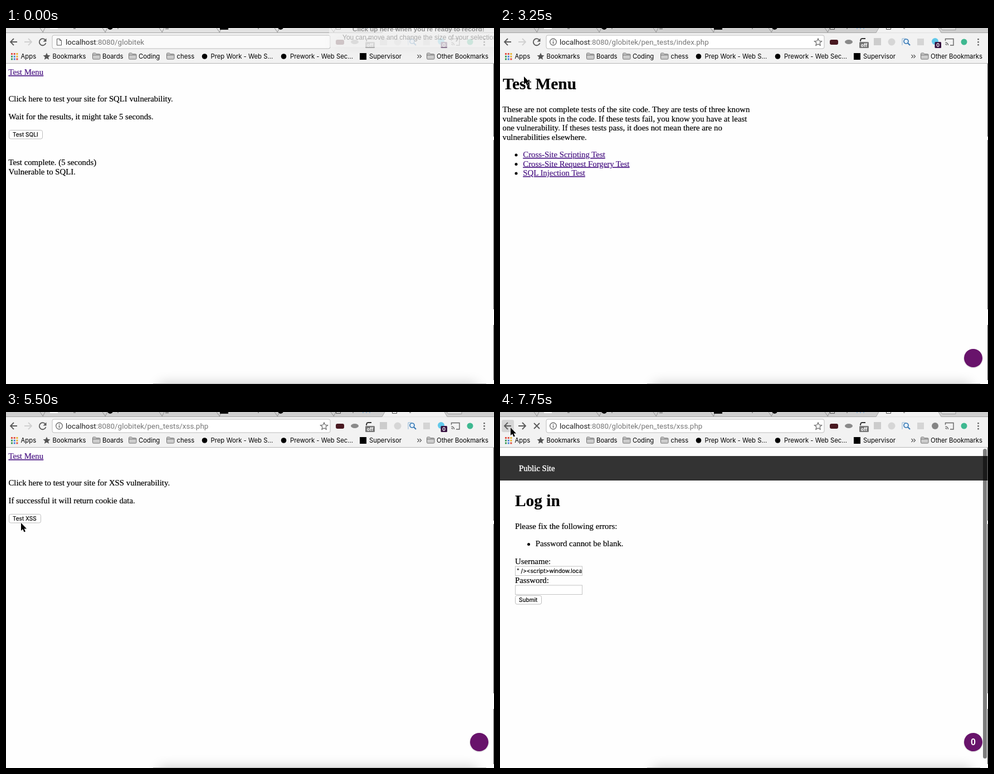
Recreate the animation shown at these times as an HTML page. Size 876 px wide and 639 px high, loop 8 s.

```html
<!DOCTYPE html>
<html lang="en">
<head>
<meta charset="utf-8">
<title>Site vulnerability tests</title>
<style>
  html, body { margin: 0; width: 100%; height: 100%; overflow: hidden; background: #fefefe; }
  svg { display: block; width: 100%; height: 100%; }
  text { white-space: pre; }
  .page { font: 14.8px "Liberation Serif", serif; }
  .page text { stroke: #000; stroke-width: .2; }
  .page .title { font-size: 29.4px; font-weight: bold; }
  .page .link { fill: #4a1684; stroke: #4a1684; text-decoration: underline; }
  .page .ui, .ui { font: 10.1px Inter, sans-serif; }
  .bookmarks { font: 11.3px Inter, sans-serif; }
  .url { font: 13.4px Roboto, sans-serif; }
  .badge { font: bold 8.5px Inter, sans-serif; fill: #fff; text-anchor: middle; }
  .button { fill: #fff; stroke: #bdbdbd; }
  .field { fill: #fff; stroke: #c4c4c4; }
  .line { fill: none; stroke: #5a5a5a; stroke-width: 1.8; }
</style>
</head>
<body>
<svg viewBox="0 0 876 639" preserveAspectRatio="none">
  <defs>
    <filter id="soft" x="-20%" y="-200%" width="140%" height="500%"><feGaussianBlur stdDeviation="11"/></filter>
    <g id="folder"><path d="M.5 2.5q0-1.5 1.5-1.5h3.5l1.5 1.7h5.5q1.5 0 1.5 1.5v6.3q0 1.5-1.5 1.5h-10.5q-1.5 0-1.5-1.5z" fill="#ccc" stroke="#707070"/><path d="M1 4.5h12.5" stroke="#707070"/></g>
    <path id="star" d="M0-6.5 1.9-2.2 6.5-1.8 3 1.3 4.1 5.8 0 3.4-4.1 5.8-3 1.3-6.5-1.8-1.9-2.2Z"/>
  </defs>
  <rect width="876" height="639" fill="#fefefe"/>

  <g class="page" data-show="0 3250">
    <text class="link" x="4.5" y="84">Test Menu</text>
    <text x="4.5" y="132">Click here to test your site for SQLI vulnerability.</text>
    <text x="4.5" y="164">Wait for the results, it might take 5 seconds.</text>
    <rect class="button" x="5.5" y="183.5" width="60" height="15.5" rx="3"/>
    <text class="ui" x="12" y="195">Test SQLI</text>
    <text x="4.5" y="246">Test complete. (5 seconds)</text>
    <text x="4.5" y="262.5">Vulnerable to SQLI.</text>
  </g>

  <g class="page" data-show="3250 4750">
    <text class="title" x="5" y="110">Test Menu</text>
    <text x="4.5" y="151">These are not complete tests of the site code. They are tests of three known</text>
    <text x="4.5" y="167.5">vulnerable spots in the code. If these tests fail, you know you have at least</text>
    <text x="4.5" y="184">one vulnerability. If theses tests pass, it does not mean there are no</text>
    <text x="4.5" y="200.5">vulnerabilities elsewhere.</text>
    <circle cx="29" cy="228" r="2.5"/><circle cx="29" cy="244.5" r="2.5"/><circle cx="29" cy="261" r="2.5"/>
    <text class="link" x="41.3" y="232">Cross-Site Scripting Test</text>
    <text class="link" x="41.3" y="248.5">Cross-Site Request Forgery Test</text>
    <text class="link" x="41.3" y="265">SQL Injection Test</text>
  </g>

  <g class="page" data-show="4750 5750">
    <text class="link" x="4.5" y="84">Test Menu</text>
    <text x="4.5" y="132">Click here to test your site for XSS vulnerability.</text>
    <text x="4.5" y="164">If successful it will return cookie data.</text>
    <rect class="button" x="5.5" y="183.5" width="57" height="15.5" rx="3"/>
    <text class="ui" x="12" y="195">Test XSS</text>
  </g>

  <g class="page" data-show="5750 8000">
    <rect y="79" width="876" height="44" fill="#333"/>
    <text x="34" y="106" style="fill: #fff; stroke: #fff; stroke-width: .4">Public Site</text>
    <text class="title" x="27" y="169">Log in</text>
    <text x="27" y="210">Please fix the following errors:</text>
    <circle cx="51.5" cy="237.5" r="2.5"/>
    <text x="63.7" y="241">Password cannot be blank.</text>
    <text x="27" y="272.5">Username:</text>
    <rect class="field" x="27.5" y="277" width="120" height="16.5"/>
    <svg x="28" y="277" width="118.5" height="17"><text class="ui" x="2" y="12">" /&gt;&lt;script&gt;window.location</text></svg>
    <text x="27" y="306.5">Password:</text>
    <rect class="field" x="27.5" y="311" width="120" height="16.5"/>
    <rect class="button" x="27.5" y="329.5" width="47" height="15.5" rx="3"/>
    <text class="ui" x="34" y="341">Submit</text>
  </g>

  <!-- Shadow and edge of neighbouring windows -->
  <rect x="275" y="638" width="570" height="30" opacity=".2" filter="url(#soft)"/>
  <path d="M264 638.5H862" stroke="#c2c2c2"/>
  <path d="M875.5 64V195M875.5 201V505M875.5 533V632" stroke="#555"/>
  <g data-show="3250 8000">
    <circle cx="849.5" cy="593.5" r="17.5" opacity=".08"/>
    <circle cx="849.5" cy="592.5" r="16.5" fill="#68136b"/>
  </g>
  <text x="849.5" y="598" fill="#fff" text-anchor="middle" font-family="Liberation Sans, sans-serif" font-size="16" font-weight="bold" data-show="7750 8000">0</text>
  <rect x="867" y="66" width="7" height="556" rx="3.5" opacity=".5" data-show="5750 8000"/>
  <g id="status" class="ui">
    <path d="M0 623H210q4 0 4 4V639H0Z" fill="#f1f1f1" stroke="#ddd"/>
    <text x="1" y="635" font-size="9.8" fill="#888">localhost:8080/globitek/pen_tests/xss.php</text>
  </g>

  <!-- Tab strip -->
  <rect id="strip" width="876" height="9"/>
  <g id="tabs" fill="none" stroke="#8f8f8f"></g>
  <path d="M675 8.5 680 0H787L792 8.5Z" fill="#f2f2f2"/>
  <path d="M0 8.5H675L680 0M787 0 792 8.5H876" fill="none" stroke="#a5a5a5"/>
  <path d="M791 0 794 3.5H818V0" fill="#ddd" stroke="#999"/>
  <g>
    <rect x="79" width="14" height="2" fill="#fff"/>
    <rect x="384" width="15" height="3"/>
    <circle cx="187" cy="-2" r="5"/><circle cx="493" cy="-2" r="5"/>
    <path d="M286 1.5H292M592.5 0V2.5H600.5V0M693.5 0V2.5H701.5V0" fill="none" stroke="#555"/>
    <path d="M121 1H125M200 1H202M452 1H454M622 1H624M724 1H727" stroke="#555"/>
    <path d="M640 1H655" stroke="#64a4d8" stroke-dasharray="2 4"/>
  </g>

  <!-- Toolbar -->
  <rect y="9" width="876" height="54" fill="#f2f2f2"/>
  <path d="M0 63.5H876" stroke="#b6b6b6"/>
  <rect x="3" y="14" width="22" height="22" rx="3" fill="#d5d5d5" data-show="7500 8000"/>
  <path class="line" d="M20 25H8.5M14 19 8 25 14 31"/>
  <path id="forward" class="line" d="M33 25H45M40 19 46 25 40 31"/>
  <g data-show="0 7750"><path class="line" d="M70.5 21.5A6 6 0 1 0 71.5 27"/><path d="M72.5 18.5V24.5H66.5Z" fill="#5a5a5a"/></g>
  <path class="line" d="M61 20 71 30M71 20 61 30" data-show="7750 8000"/>
  <rect id="omnibox" x="83" y="13" width="499" height="24" rx="3"/>
  <path d="M91.5 19.5H96.5L99.5 22.5V31H91.5ZM96.5 19.5V22.5H99.5" fill="none" stroke="#5a5a5a" data-show="0 3250"/>
  <g data-show="3250 8000">
    <circle cx="95.5" cy="25" r="5.8" fill="none" stroke="#5a5a5a" stroke-width="1.2"/>
    <path d="M95.5 24V28.5M95.5 21.5V23" stroke="#5a5a5a" stroke-width="1.4"/>
    <use href="#star" x="571" y="25.5" fill="none" stroke="#666" stroke-width="1.2"/>
  </g>
  <text class="url" x="107" y="29.5" fill="#222">localhost<tspan id="path" fill="#777"></tspan></text>
  <path d="M250 17V33" stroke="#111" data-show="2500 3250"/>

  <g id="extensions">
    <rect x="592" y="21" width="15" height="9" rx="3" fill="#481820"/>
    <ellipse cx="626" cy="25" rx="7" ry="4" fill="#8a8a8a"/>
    <path d="M656 19H650Q647 19 647 24" fill="none" stroke="#333" stroke-width="2"/>
    <rect x="645" y="25" width="17" height="11" rx="1.5" fill="#777"/><text class="badge" x="653.5" y="33.5">off</text>
    <rect x="671" y="18" width="13" height="13" fill="#ccc"/>
    <circle cx="703" cy="25" r="6.5" fill="#d6d6d6"/>
    <path d="M722 31V19H728" fill="none" stroke="#8bb3d6"/>
    <circle cx="729" cy="24" r="4" fill="#e5f0fa" stroke="#3679b5" stroke-width="1.7"/><path d="M732 27 736 31" stroke="#3679b5" stroke-width="2.2"/>
    <rect x="749" y="19" width="12" height="12" fill="#d5d5d5"/>
    <g data-show="0 7750">
      <circle cx="781" cy="24" r="6" fill="#62c9ea"/>
      <rect x="780.5" y="25" width="11.5" height="11" rx="1.5" fill="#36103f"/><text class="badge" x="786" y="33.5">0</text>
    </g>
    <circle cx="781" cy="25" r="6" fill="#858585" data-show="7750 8000"/>
    <path d="M799.5 23V19.5H814V31H808M799.5 26A5 5 0 0 1 804.5 31M799.5 29A2 2 0 0 1 801.5 31" fill="none" stroke="#666" stroke-width="1.4"/>
    <circle cx="833" cy="25" r="5.5" fill="#3eb890"/>
  </g>
  <path d="M858.5 19v2.6M858.5 24v2.6M858.5 29v2.6" stroke="#666" stroke-width="2.6"/>

  <g class="bookmarks">
    <g id="apps"></g>
    <text x="26.5" y="54.5">Apps</text>
    <use href="#star" x="73" y="51" fill="#555"/><text x="83.5" y="54.5">Bookmarks</text>
    <use href="#folder" x="155" y="44"/><text x="173" y="54.5">Boards</text>
    <use href="#folder" x="220" y="44"/><text x="238" y="54.5">Coding</text>
    <use href="#folder" x="288" y="44"/><text x="306.5" y="54.5">chess</text>
    <circle cx="356.5" cy="51" r="4.8"/><text x="367.5" y="54.5">Prep Work - Web S...</text>
    <circle cx="498.5" cy="51" r="4.8"/><text x="510" y="54.5">Prework - Web Sec...</text>
    <rect x="635" y="45" width="12" height="12"/><text x="652" y="54.5">Supervisor</text>
    <path d="M738.5 48 741.5 51 738.5 54M742.5 48 745.5 51 742.5 54" fill="none" stroke="#555" stroke-width="1.2"/>
    <use href="#folder" x="755" y="44"/><text x="773" y="54.5">Other Bookmarks</text>
  </g>

  <g id="recorder" font-family="Liberation Sans, sans-serif" font-size="12" fill="#8e8e8e">
    <rect x="590" y="12" width="300" height="26" opacity=".1" filter="url(#soft)"/>
    <rect x="580" width="296" height="34" fill="#f6f6f6" opacity=".6"/>
    <text x="622" y="6" font-size="11.7" font-weight="bold">Click up here when you're ready to record!</text>
    <text x="604" y="21" fill="#aaa">You can move and change the size of your selection</text>
  </g>

  <path id="cursor" d="M0 0V14L3.2 11.2 5.5 16.5 7.9 15.5 5.6 10.4H10Z" stroke="#fff" paint-order="stroke"/>
</svg>
<script>
  const LOOP = 8000, STEP = 250, FOCUS = 2500, MENU = 3250, LOADING = 7750;
  const byId = id => document.getElementById(id);
  const timed = [...document.querySelectorAll('[data-show]')].map(node => [node, ...node.dataset.show.split(' ').map(Number)]);

  // time, x, y of the pointer tip
  const pointer = [
    [0, 750, -30], [1250, 22, 187], [1750, 50, 127], [2500, 43, 87],
    [MENU, 43, 87], [4250, 63, 228], [4750, 63, 157], [5250, 27, 199],
    [6000, 27, 199], [7000, 19, 28], [LOOP, 19, 28]
  ];
  const addresses = [
    [0, ''], [MENU, '/pen_tests/index.php'], [4750, '/pen_tests/xss.php'],
    [5750, '/public/staff/login.php'], [LOADING, '/pen_tests/xss.php']
  ];

  byId('tabs').innerHTML = [66, 178, 280, 383, 487, 588]
    .map(x => `<path d="M${x} 8 ${x + 4} 0M${x - 5} 0 ${x} 7"/>`).join('');
  const dotColors = ['#df4b3e', '#df4b3e', '#e8b22e', '#3b9a58', '#4680dc', '#e8b22e', '#3b9a58', '#4680dc', '#df4b3e'];
  byId('apps').innerHTML = dotColors.map((color, i) =>
    `<rect x="${9 + i % 3 * 4.7}" y="${45 + Math.floor(i / 3) * 4.7}" width="3" height="3" fill="${color}"/>`).join('');

  function pointerAt(t) {
    const next = pointer.findIndex(key => key[0] > t);
    const [t0, x0, y0] = pointer[next - 1], [t1, x1, y1] = pointer[next];
    const k = (t - t0) / (t1 - t0);
    return [x0 + (x1 - x0) * k, y0 + (y1 - y0) * k];
  }

  function render(t) {
    for (const [node, from, to] of timed) node.style.display = t >= from && t < to ? '' : 'none';
    byId('cursor').setAttribute('transform', `translate(${pointerAt(t)})`);
    byId('path').textContent = ':8080/globitek' + addresses.findLast(([start]) => t >= start)[1];

    const focused = t >= FOCUS, editing = focused && t < MENU;
    byId('strip').setAttribute('fill', focused ? '#cfcfcf' : '#e2e2e2');
    byId('extensions').style.opacity = focused ? 1 : .55;
    byId('forward').style.stroke = t >= LOADING ? '#5a5a5a' : '#d0d0d0';
    const box = byId('omnibox').style;
    box.fill = focused ? '#fff' : '#fafafa';
    box.stroke = editing ? '#6ca6dc' : '#bcbcbc';
    box.strokeWidth = editing ? 2 : 1;

    byId('recorder').style.opacity = Math.max(0, 1 - t / 500);
    byId('status').style.opacity = t < 4000 || t >= 5000 ? 0 : t < 4750 ? 1 : .15;
  }

  function tick() {
    render(Math.floor(performance.now() % LOOP / STEP) * STEP);
    requestAnimationFrame(tick);
  }
  tick();
</script>
</body>
</html>
```
